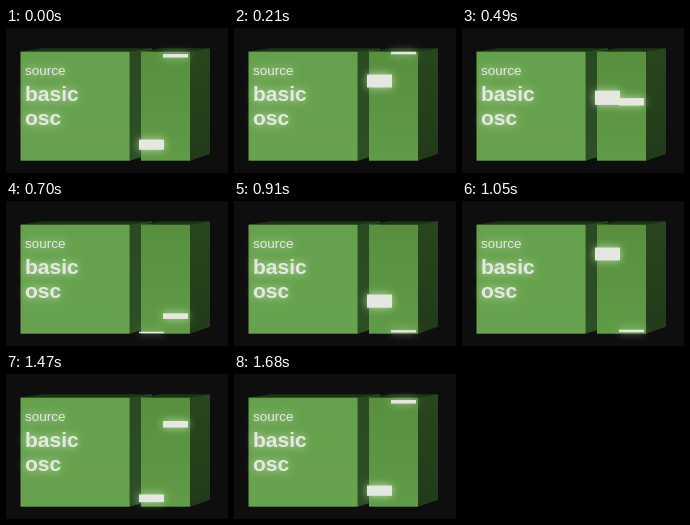
Recreate the animation shown at these times as an HTML page with a canvas. Size 222 by 145 pixels, loop 1750 ms.

```html
<!DOCTYPE html>
<html lang="en">
<head>
<meta charset="utf-8">
<title>Basic oscillator</title>
<style>
  html, body { margin: 0; width: 100%; height: 100%; overflow: hidden; background: #0d0e0d; }
  canvas { display: block; }
</style>
</head>
<body>
<canvas id="stage" width="222" height="145"></canvas>
<script>
const ctx = document.getElementById('stage').getContext('2d');
const LOOP = 1750, STEP = 70, RAD = Math.PI / 180;
const TOP = 23.6, BOTTOM = 132.7, BACK = 20.3;
const LIGHT = '#e4e8e1';

function shade(from, to) {
  const g = ctx.createLinearGradient(0, TOP, 0, BOTTOM);
  g.addColorStop(0, from);
  g.addColorStop(1, to);
  return g;
}

function poly(fill, ...points) {
  ctx.fillStyle = fill;
  ctx.beginPath();
  points.forEach(([x, y]) => ctx.lineTo(x, y));
  ctx.fill();
}

function box(left, right, depth, face, side) {
  poly('#1b3415', [left, TOP], [left + depth, BACK], [right + depth, BACK], [right, TOP]);
  poly(side, [right, TOP], [right + depth, BACK], [right + depth, BOTTOM - 7], [right, BOTTOM]);
  ctx.fillStyle = face;
  ctx.fillRect(left, TOP, right - left, BOTTOM - TOP);
}

// Draws in soft white light with a pale green halo.
function lit(paint) {
  ctx.save();
  ctx.filter = 'blur(0.4px)';
  ctx.fillStyle = LIGHT;
  ctx.shadowColor = 'rgba(215,240,200,.8)';
  ctx.shadowBlur = 9;
  paint();
  ctx.restore();
}

function label(text, y, font) {
  lit(() => {
    ctx.font = font + ' "Liberation Sans", Arial, sans-serif';
    ctx.fillText(text, 19, y);
  });
}

// The bar is stretched in proportion to its speed.
function bar(x, angle, blur) {
  const y = 77.5 + 54 * Math.cos(angle * RAD);
  const h = 1 + blur * Math.abs(Math.sin(angle * RAD));
  lit(() => ctx.fillRect(x, y - h / 2, 25, h));
}

function draw(now) {
  const n = Math.floor((now % LOOP) / STEP);
  const phase = n - 0.55 * Math.sin(n * 30 * RAD);

  ctx.fillStyle = '#0d0e0d';
  ctx.fillRect(0, 0, 222, 145);
  box(14.5, 123.7, 22.5, shade('#65a14c', '#68a24e'), shade('#284a1e', '#2c5024'));
  box(135, 184, 20, shade('#578f3e', '#609b46'), shade('#28461d', '#213b19'));

  label('source', 47, '13.5px');
  label('basic', 72.5, 'bold 21px');
  label('osc', 97, 'bold 21px');

  bar(157, 157 + 15 * phase, 6.5);
  bar(133, 43.5 + 30 * phase, 13.4);
  requestAnimationFrame(draw);
}

draw(0);
</script>
</body>
</html>
```
